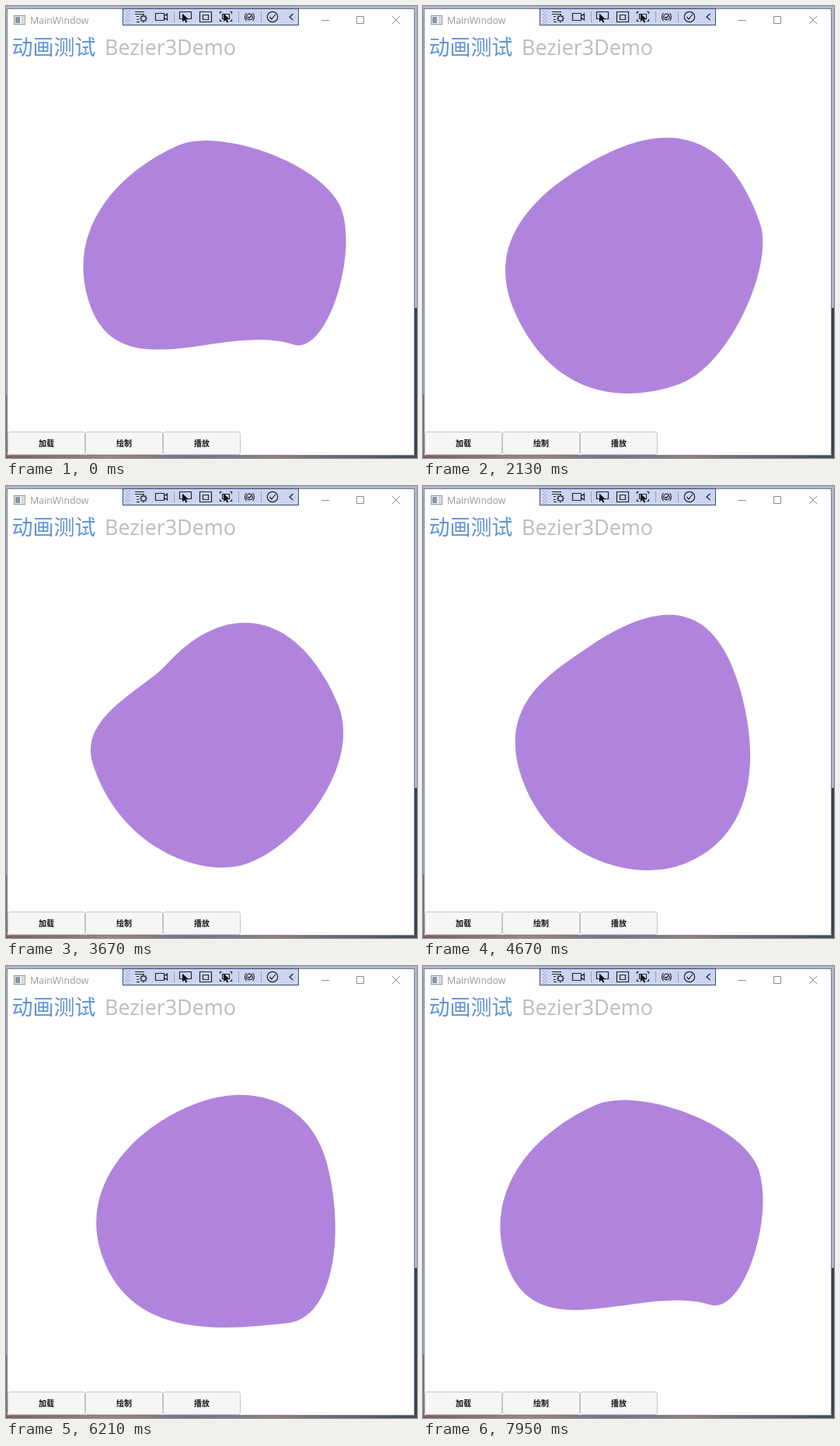
Recreate the animation shown at these times as an HTML page. Size 529 by 581 pixels, loop 8.01 s.

```html
<!DOCTYPE html>
<html lang="zh">
<head>
<meta charset="utf-8">
<title>MainWindow</title>
<style>
  html, body { margin: 0; width: 100%; height: 100%; overflow: hidden; background: #fff; }
  svg { display: block; }
  text { font-family: "Open Sans", "Noto Sans CJK SC", "Noto Sans CJK", sans-serif; }
  .cjk { font-family: "Noto Sans CJK SC", "Noto Sans CJK", sans-serif; }
  .line { fill: none; stroke: #23262f; stroke-width: 1.2; }
  .button rect { fill: #f6f6f5; stroke: #c3c3c3; }
  .button text { font-size: 10px; font-weight: 700; text-anchor: middle; fill: #111; }
</style>
</head>
<body>
<svg width="529" height="581" viewBox="0 0 529 581">
  <defs>
    <linearGradient id="ground">
      <stop offset="0" stop-color="#77605f"/>
      <stop offset=".25" stop-color="#a1837c"/>
      <stop offset=".45" stop-color="#6f7480"/>
      <stop offset=".65" stop-color="#8d7f83"/>
      <stop offset="1" stop-color="#3f4a55"/>
    </linearGradient>
    <path id="cursor" d="M0 0V11L2.6 8.5L4.5 12L6.3 11L4.5 7.7H8Z" fill="#111"/>
  </defs>

  <!-- desktop and window -->
  <rect width="529" height="581" fill="#adb6cb"/>
  <rect y="500" width="3" height="81" fill="#8a7474"/>
  <rect x="524" y="388" width="5" height="193" fill="#37424e"/>
  <rect y="576" width="529" height="5" fill="url(#ground)"/>
  <rect x="1.5" y="3.5" width="524" height="574" fill="#fff" stroke="#75809a"/>

  <!-- title bar -->
  <rect x="10.5" y="12.5" width="14" height="11" fill="#f4f5f6" stroke="#8b8f94"/>
  <path d="M12 14H18V22H12Z" fill="#8497aa"/>
  <path d="M20 15H23M20 18H23M20 21H23" stroke="#8b8f94"/>
  <text x="31" y="23" font-size="12.4" fill="#999">MainWindow</text>
  <path d="M406 18.5H416M451.5 13.5H460.5V22.5H451.5ZM497 13L507 23M507 13L497 23" fill="none" stroke="#8d8d8d"/>

  <!-- debug toolbar -->
  <rect x="150.5" y="3.5" width="226" height="21" fill="#ccd5f0" stroke="#3c4b78"/>
  <path d="M154.5 6V23M158.5 6V23M156.5 8V22" stroke="#7782a2" stroke-dasharray="1 3"/>
  <path d="M216.5 7V21M299.5 7V21M328.5 7V21" stroke="#95a0bd"/>
  <g class="line">
    <path d="M166 7.5H178M166 10.5H178M168 13.5H171M168 17.5H171M168 20.5H172"/>
    <circle cx="177" cy="16" r="3.2"/>
    <path d="M177 11V13M177 19V21.5M172 16H174M180 16H182M173.5 12.5L175 14M179 18L180.5 19.5M180.5 12.5L179 14M175 18L173.5 19.5"/>
    <path d="M192.5 9.5H203.5V18.5H192.5ZM203.5 13L207.5 10V18L203.5 15"/>
    <path d="M227 16.5H223.5V7.5H238.5V16.5H234"/>
    <path d="M249.5 7.5H264.5V20.5H249.5ZM253.5 11.5H260.5V17.5H253.5Z"/>
    <path d="M275.5 10V7.5H278M288 7.5H290.5V10M290.5 17V19.5H288M278 19.5H275.5V17M278.5 10.5H287.5V16.5H278.5Z"/>
    <path d="M309.5 9Q305.5 14 309.5 19M317.5 9Q321.5 14 317.5 19"/>
    <circle cx="313.5" cy="14" r="3.8"/>
    <path d="M311.5 14L313 15.7L316 12"/>
    <circle cx="343" cy="14" r="6.7"/>
    <path d="M339.5 14L342 17L347 10.5"/>
    <path d="M369.5 10L365 14L369.5 18"/>
  </g>
  <use href="#cursor" x="227" y="9.5"/>
  <use href="#cursor" x="280" y="9.5"/>

  <!-- heading -->
  <text class="cjk" x="7.5" y="63" font-size="27" fill="#5b94d8">动画测试</text>
  <text x="127" y="63" font-size="26.9" fill="#bcbcc0">Bezier3Demo</text>

  <path id="blob" fill="#b084dc"/>

  <g class="button"><rect x="2.5" y="547.5" width="99" height="29" rx="2.5"/><text class="cjk" x="52" y="566">加载</text></g>
  <g class="button"><rect x="102.5" y="547.5" width="99" height="29" rx="2.5"/><text class="cjk" x="152" y="566">绘制</text></g>
  <g class="button"><rect x="202.5" y="547.5" width="99" height="29" rx="2.5"/><text class="cjk" x="252" y="566">播放</text></g>
</svg>

<script>
const LOOP = 8010, STEP = LOOP / 120, START = 7613;
const blob = document.getElementById('blob');

// Each pose has four nodes: x, y, tangent angle, handle length in, handle length out.
const dented = [222,179,-24,83,58,   432,262,71,62,63,   370,435,198,45,95,  106,378,253,125,98];
const round  = [230,178,-17,80,105,  432,262,68,83,70,   358,461,168,55,90,  111,387,248,145,96];
const leaning = [226,195,-28,75,118, 434,280,71,110,55,  330,486,160,70,70,  118,393,246,125,108];
const bean   = [207,229,-48,45,110,  427,280,67,135,84,  305,487,164,72,58,  112,358,252,112,65];
const pear   = [213,207,-34,62,114,  410,268,75,127,100, 338,485,158,87,70,  127,375,251,112,98];
const squat  = [205,196,-31,75,112,  412,250,74,86,85,   362,459,174,65,70,  132,392,243,100,95];

const mix = (a, b, u) => a.map((v, i) => v + (b[i] - v) * u);
const stretch = (pose, k, dx, dy) =>
  pose.map((v, i) => i % 5 === 0 ? v + dx : i % 5 === 1 ? v * k + dy : v);

const rest = stretch(round, 1, -1.5, -5.5);
const keys = [
  [START - LOOP, rest],
  [-30, dented],
  [800, round],
  [1450, stretch(mix(round, leaning, .5), 1.073, 0, -15.7)],
  [2130, leaning],
  [3670, bean],
  [4670, pear],
  [5200, stretch(mix(pear, squat, .3), 1.053, 0, -15)],
  [6210, squat],
  [7350, rest]
];

// Speed of value i at key k; the motion starts and ends at rest.
function slope(k, i) {
  const a = keys[k - 1], b = keys[k + 1];
  return a && b ? (b[1][i] - a[1][i]) / (b[0] - a[0]) : 0;
}

function poseAt(t) {
  if (t >= START) t -= LOOP;
  if (t >= 7350) return rest;
  const k = keys.findIndex(key => key[0] > t) - 1;
  const [t0, p] = keys[k], [t1, q] = keys[k + 1];
  const d = t1 - t0, u = (t - t0) / d, e = u * u * (3 - 2 * u);
  return p.map((v, i) => v + (q[i] - v) * e
    + d * u * (1 - u) * ((1 - u) * slope(k, i) - u * slope(k + 1, i)));
}

function outline(pose) {
  const nodes = [0, 5, 10, 15].map(n => {
    const [x, y, angle, back, ahead] = pose.slice(n, n + 5);
    const r = angle * Math.PI / 180;
    const at = s => (x + s * Math.cos(r)).toFixed(2) + ' ' + (y + s * Math.sin(r)).toFixed(2);
    return { point: at(0), before: at(-back), after: at(ahead) };
  });
  return 'M' + nodes[0].point + nodes.map((n, i) => {
    const next = nodes[(i + 1) % 4];
    return `C${n.after} ${next.before} ${next.point}`;
  }).join('') + 'Z';
}

function draw() {
  const t = (performance.now() + 8) % LOOP;
  blob.setAttribute('d', outline(poseAt(Math.floor(t / STEP) * STEP)));
  requestAnimationFrame(draw);
}
draw();
</script>
</body>
</html>
```
